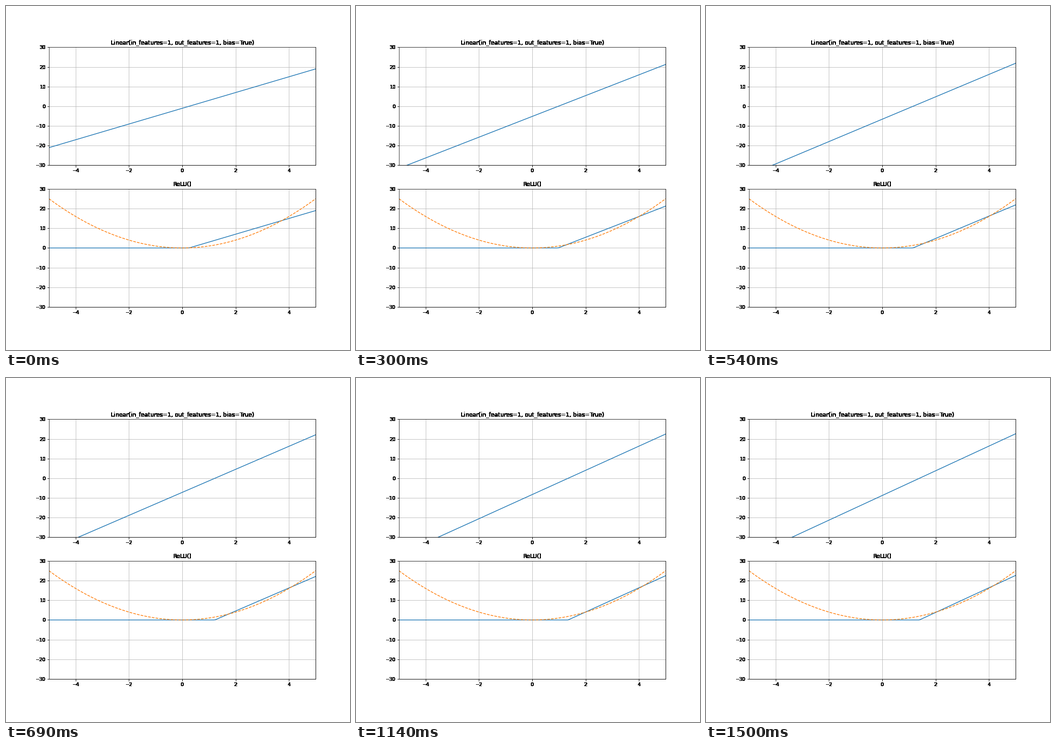
Animation, 720 px wide and 720 px high, one loop 1.53 s. Source, as a matplotlib script:

```python
import numpy as np
import matplotlib.pyplot as plt
from matplotlib.animation import FuncAnimation

FRAMES, INTERVAL = 51, 30

plt.rcParams.update({
    "font.family": "DejaVu Sans",
    "font.size": 10,
    "figure.subplot.bottom": 0.125,
})


def harden(img, dpi):
    """Give every dark pixel full opacity, so small text loses its soft edges."""
    dark = img[..., :3].max(axis=-1) < 0.4
    img = img.copy()
    img[dark] = (0, 0, 0, 1)
    return img, 0, 0


def weights(step):
    """Slope and bias of the neuron: a fast and a slow mode of convergence."""
    moved = 8.4 - 6.17 * np.exp(-0.044 * step) - 2.23 * np.exp(-0.2 * step)
    slope = 4 + 0.329 * moved - 0.0045 * moved ** 2
    return slope, -1 - moved


def style(ax, title):
    ax.set_title(title, fontsize=12)
    ax.set_xlim(-5, 5)
    ax.set_ylim(-30, 30)
    ax.grid(True)
    hard = (ax.title, ax.xaxis, ax.yaxis, ax.spines["right"], ax.spines["bottom"])
    for artist in hard:
        artist.set_agg_filter(harden)


fig, (top, low) = plt.subplots(2, 1, figsize=(10, 10), dpi=72, facecolor="white")
style(top, "Linear(in_features=1, out_features=1, bias=True)")
style(low, "ReLU()")

x = np.linspace(-5, 5, 200)
linear, = top.plot(x, x)
relu, = low.plot(x, x)
low.plot(x, x ** 2, "--")


def update(step):
    slope, bias = weights(step)
    y = slope * x + bias
    linear.set_ydata(y)
    relu.set_ydata(np.maximum(y, 0))
    return linear, relu


anim = FuncAnimation(fig, update, frames=FRAMES, interval=INTERVAL,
                     repeat=True, repeat_delay=0)
plt.show()
```
